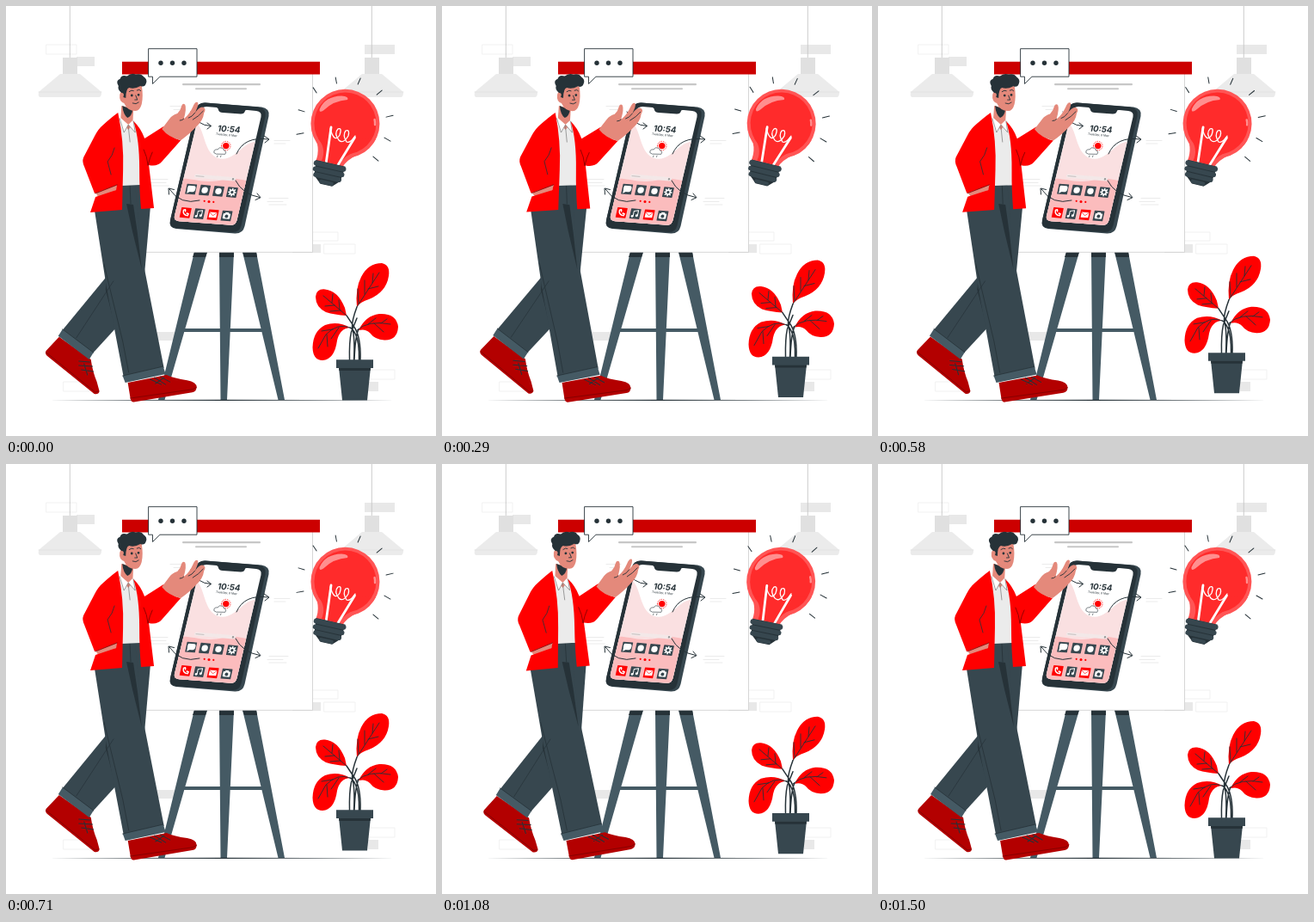
These frames come from a looping animation (500 by 500 pixels, 1540 ms). An HTML page with a canvas:

```html
<!DOCTYPE html>
<html lang="en">
<head>
<meta charset="utf-8">
<style>
html, body { margin: 0; width: 100%; height: 100%; overflow: hidden; background: #fff; }
canvas { display: block; width: 500px; height: 500px; }
</style>
</head>
<body>
<canvas id="stage"></canvas>
<script>
const canvas = document.getElementById('stage');
const ctx = canvas.getContext('2d');
const ratio = window.devicePixelRatio || 1;
canvas.width = canvas.height = 500 * ratio;

const LOOP = 1540, STEP = 1000 / 24, STEPS = 37;
const INK = '#263238', SLATE = '#37474f', STEEL = '#455a64';
const RED = '#ff0000', DEEP = '#cc0000', SHOE = '#b30000', SKIN = '#e4897b';
const PALE = '#ebebeb', MUTED = '#e0e0e0';

const paths = new Map();
function shape(d) {
  if (!paths.has(d)) paths.set(d, new Path2D(d));
  return paths.get(d);
}
function fill(d, color) {
  ctx.fillStyle = color;
  ctx.fill(shape(d));
}
function line(d, color = INK, width = 1) {
  ctx.strokeStyle = color;
  ctx.lineWidth = width;
  ctx.stroke(shape(d));
}
function rect(x, y, w, h, color, r = 0) {
  ctx.fillStyle = color;
  ctx.beginPath();
  ctx.roundRect(x, y, w, h, r);
  ctx.fill();
}
function dot(x, y, r, color) {
  ctx.fillStyle = color;
  ctx.beginPath();
  ctx.arc(x, y, r, 0, Math.PI * 2);
  ctx.fill();
}
function group(draw) {
  ctx.save();
  draw();
  ctx.restore();
}
function turnAbout(x, y, angle) {
  ctx.translate(x, y);
  ctx.rotate(angle);
  ctx.translate(-x, -y);
}

function drawLamp(x) {
  group(() => {
    ctx.translate(x, 0);
    line('M.3 0V60', '#c7c7c7', .9);
    fill('M-8 60H9V79H-8Z', MUTED);
    fill('M-11 79H12L37 100Q37 106 34 106H-34Q-37 106-36 100Z', PALE);
    line('M-36 100H37', MUTED, .7);
  });
}

function drawRoom() {
  const solid = [[417, 45, 35, 11], [82, 59, 21, 11], [333, 277, 33, 10], [165, 379, 31, 10], [421, 437, 12, 11]];
  const hollow = [[47, 45, 35, 11], [357, 263, 29, 10], [370, 277, 36, 11], [67, 437, 30, 11], [421, 423, 31, 11]];
  solid.forEach(b => rect(...b, '#e8e8e8'));
  ctx.strokeStyle = '#eeeeee';
  ctx.lineWidth = .8;
  hollow.forEach(b => ctx.strokeRect(...b));
  drawLamp(74);
  drawLamp(425);
}

function drawBoard() {
  fill('M219 286H234L184.5 458H177Z M248 286H265L257 458H249.5Z M275 286H291L324 458H316.5Z', STEEL);
  fill('M219 286H234L232 292H217Z M248 286H265V292H248Z M275 286H291L292 292H277Z', INK);
  rect(205, 375, 94, 4, STEEL);
  fill('M49 458.3L251 457.7L453 458.3L251 458.9Z', INK);
  rect(143, 79, 214, 207, '#fff');
  line('M356.5 79V286.3H143', '#d2d2d2', .9);
  rect(135, 64.7, 230, 14.8, DEEP);
  rect(205, 90, 91, 2.2, '#c7c7c7', 1);
  rect(220, 95.2, 60, 2, '#c7c7c7', 1);
  line('M312 156.5H330M312 160H325M306 223.5H328M304 227.5H322M306 231H326M168 201.5H188M168 205.5H186M168 209H189M191 116.5H208M195 120.5H206', '#e6e6e6', .8);
}

function drawBubble() {
  fill('M166 49.7H222V82H179L170.5 90.5V82H166Z', '#fff');
  line('M166 49.7H222V82.2H179L170.5 90.5V82.2H166Z', INK, .9);
  [180, 193.5, 207].forEach(x => dot(x, 66.3, 2.7, INK));
}

// Places a drawing in the slanted plane of the phone screen.
function onScreen(x, y, draw) {
  group(() => {
    ctx.transform(1, .085, -.22, 1, x, y);
    draw();
  });
}

function drawIcons() {
  const glyphs = [
    () => fill('M-3-4H3Q5-4 5-1Q5 3 2 3H-1L-4 5V2Q-5-4-3-4Z', '#fff'),
    () => dot(0, 0, 3.6, '#fff'),
    () => dot(0, 0, 3.6, '#fff'),
    () => {
      line('M0-4V4M-4 0H4M-2.9-2.9L2.9 2.9M2.9-2.9L-2.9 2.9', '#fff', 1.6);
      dot(0, 0, 3.2, '#fff');
      dot(0, 0, 1.6, SLATE);
    },
    () => line('M-3-3Q-3 3 3 3L3.5 1L1.5 .5M-3-3L-1-3.5L-.5-1.5', '#fff', 1.5),
    () => {
      line('M-2 3V-3L3-4V2', '#fff', 1);
      dot(-3, 3, 1.4, '#fff');
      dot(2, 2, 1.4, '#fff');
    },
    () => {
      rect(-4.3, -3, 8.6, 6.2, '#fff');
      line('M-4-2.5L0 1L4-2.5', RED, .6);
    },
    () => {
      rect(-4.2, -2.8, 8.4, 6.2, '#fff', 1);
      rect(-2, -4, 4, 2, '#fff');
      dot(0, .4, 2, SLATE);
    }
  ];
  glyphs.forEach((glyph, i) => {
    const row = i >> 2, col = i % 4;
    onScreen(215.2 + col * 15.9 - row * 6.4, 213 + col * 1.2 + row * 27.4, () => {
      rect(-5.8, -5.9, 11.6, 11.8, i === 4 || i === 6 ? RED : SLATE, .5);
      glyph();
    });
  });
}

function drawPhone() {
  fill('M232 112.5L297 117.5Q307 119 305.5 128L277.5 256Q275.5 265 266 264.6L198 259Q189 258 191 249L221 120Q223 112 232 112.5Z', SLATE);
  fill('M232 112.5L293 117.5Q303 119 301.5 128L273.5 255Q271.5 263.5 263 263L198 258.5Q189 257.5 191 249L221 120Q223 112 232 112.5Z', INK);
  const screen = 'M233 117L245 118Q247 119 247 121Q248 124 252 124L273 125.5Q277 125.5 278 122Q278 120.5 281 121L291 122Q298 123 296.5 129L268.5 249Q267 255 262 254.7L201 250.2Q194.5 249.5 196 244L225 123Q227 117 233 117Z';
  group(() => {
    ctx.clip(shape(screen));
    fill('M180 100H310V270H180Z', '#fff');
    fill('M218 132C228 139 229 153 234 164C240 178 253 182 265 173C276 165 284 155 296 158V270H180V132Z', '#fae0e1');
    fill('M180 202C210 197 222 205 238 204C255 203 265 196 290 207V270H180Z', '#fbbcbd');
  });
  onScreen(258, 147, () => {
    ctx.fillStyle = INK;
    ctx.textAlign = 'center';
    ctx.font = 'bold 9.6px Inter, sans-serif';
    ctx.fillText('10:54', .4, -.5);
    ctx.font = '3.3px Inter, sans-serif';
    ctx.fillText('Tuesday, 6 May', -1, 4);
  });
  ctx.setLineDash([.6, 1.8]);
  line('M250.6 162.6A5.2 5.2 0 1 1 261 162.6A5.2 5.2 0 1 1 250.6 162.6', RED, .8);
  ctx.setLineDash([]);
  dot(255.8, 162.6, 3.7, RED);
  const cloud = 'M244 172Q240.5 171 242 168.3Q244 166 246 167Q248 163.5 251.5 165.2Q253.5 166 253.5 168Q257 169 255 172Z';
  fill(cloud, '#fff');
  line(cloud, INK, .6);
  line('M246 174L245.5 175.5M250 174L249.5 175.5', INK, .6);
  onScreen(243, 199.5, () => {
    rect(-24, -2.2, 48, 4.4, '#f3e8e8', 2);
    line('M-22 0H-13', '#aaa', .6);
    dot(21, 0, 1.2, '#999');
  });
  [[230.7, 226.8], [236, 227.4], [241.3, 227.9]].forEach(([x, y], i) => dot(x, y, i === 1 ? 1.5 : 1.1, RED));
  drawIcons();
  line('M215 123Q222 139 238 139.5M234 136L238.5 139.5L234 143M268 172Q277 151 305 155M300 151L306 155L301 159M267 203Q275 219 295 222.5M292 218L296 222.7L290 225.5M225 226Q203 232 190 213M189.5 219L189 212L195.5 213.5', INK, 1);
}

function drawShoes() {
  fill('M62 385L99 411Q101 425 106 437L109 448Q108 452 103 451L48 407Q45 404 47 401Z', SHOE);
  line('M47 403L104 449L108 448', '#7d0000', .8);
  line('M85 413L98 414M85 418L101 419M88 423L102 425M91 416L95 429', INK, 1);
  fill('M142 438L187 429Q196 433 211 435Q222 437 222 443Q222 448 217 449L149 460.5Q146 461 145 456Z', SHOE);
  line('M145 456L218 445.5L222 443', '#7d0000', .8);
  line('M168 434L181 440M173 432L186 440M180 431L191 437M174 439L184 432', INK, 1);
}

function drawTrousers() {
  fill('M120 311L66 377L101 404L132 370Z', SLATE);
  fill('M134 208H158L168 232L160 325L140 345L118 300L108 236Z', SLATE);
  fill('M117 315L132 368L128 376L116 330Z', INK);
  fill('M103 238L135 208H150L158 290L184 421L137 431L117 327Z', SLATE);
  fill('M140 230L148 231L153 265L158 306L147 262Z', INK);
  line('M114 300L136 390L143 426M156 210L159 234M144 209L145 230', INK, .8);
  line('M125 320L82 386', INK, .7);
  fill('M66 376L102 403L97 411L61 384Z', STEEL);
  line('M66 376L102 403', INK, .8);
  fill('M136 430L183 419L186 428L139 438Z', STEEL);
  line('M136 430L183 419', INK, .8);
}

function drawHand() {
  fill('M181 143L190 131Q193 127 199 125Q203 121 203.5 117Q205 112 208 114.5Q210 119 206.5 131Q213 126 217 117Q220 110 222.8 112Q224 115 219.5 124Q225 116 229 117.5Q233 119 230 124Q229 133 221 140Q214 148 203 156Q189 153 181 143Z', SKIN);
  line('M206.5 131Q205 133 202 133M219.5 124Q216 129 212 130M229 122Q224 128 217 132', INK, .9);
}

function drawTorso() {
  fill('M131 130L150 134L156 155V208L134 209Z', PALE);
  fill('M134 116L148 119L147 138L142 144L133 133Z', SKIN);
  fill('M135 116L147 121Q146 128 141 130Q136 126 135 116Z', INK);
  fill('M133 130L142 138L137 147L131 134Z M147 133L150 147L142 138Z', '#fff');
  line('M132 131L137 147L142 138L150 147L148 134M142 140L144 158', '#777', .7);
  fill('M105 212L128 206L130 213L112 222Q103 223 105 212Z', SKIN);
  fill('M130 124Q123 129 113 138Q107 143 103 151L90 176Q88 181 91 187L103 218L129 208L128 214L104 222L98 240L135 237L136 190Q137 157 130 124Z', RED);
  fill('M148 134Q156 141 161 154L183 140Q191 154 203 156L181 181Q176 187 166 185L172 235L157 236Q155 215 155 190Q155 155 148 134Z', RED);
  line('M104 218L129 208M165 185Q164 175 160 167M170 170Q167 176 165 185', '#7a0000', .8);
  line('M126 165Q124 174 118 181L122 196', INK, .8);
  drawHand();
}

function drawHead() {
  fill('M136 93H157.5Q159.5 105 157.5 114Q155.5 122 150 122Q141 122 137 113Q131 111 132 103Q133 98 137 101Z', SKIN);
  fill('M134 101Q129 97 130.5 93Q126.5 87 132.5 84.5Q133.5 79.5 140.5 81.5Q145 77.5 150.5 79.5Q157 78 159.5 82Q164.5 85 162.5 90Q161 95 156 93Q149 97 143 95Q139 96 139 107L136 106Q138 101 134 101Z', INK);
  dot(146, 104, 1.4, INK);
  dot(153.8, 103.3, 1.4, INK);
  line('M143 99.5Q146 97 148 98.5M152 98Q155 96 156.5 98.5M150.5 104L152.5 109L149.5 109M147 113Q151 115 154 112', INK, .9);
}

function drawMan(angle) {
  group(() => {
    turnAbout(136, 255, angle);
    drawShoes();
    drawTrousers();
    drawTorso();
    drawHead();
  });
}

function drawBulb(angle) {
  const rim = '#ff5555', glass = '#ff2b2b', shine = '#ff8f8f';
  group(() => {
    turnAbout(394, 150, angle);
    line('M357 95L361 101M340 121L347 123M338 149.5L346 148M383 83L384.3 90M412 84L409 91M437 98L431 103M442 129L450 127M440 153L447 157M427 175L433 180', INK, 1);
    fill('M356.5 148Q367 164 360 181L391 188Q396 179 409 173Q424 166 430 155Z', rim);
    dot(394.4, 136.8, 40, rim);
    dot(394.4, 136.5, 36, glass);
    fill('M363 154Q373 166 367 180L387 185Q393 174 409 168L424 155Z', glass);
    fill('M364.5 120Q371 105 390 104.5Q399 105 397 109Q381 110 369 121.5Q364 125 364.5 120Z', shine);
    line('M428.5 132Q429.3 135 429 138', shine, 2.4);
    line('M378 141L372.5 181M405.5 153L386 185', '#fff', 2.8);
    line('M377 143Q382 160 388 150Q391 141 386 143Q381 148 387 156Q392 161 398 151Q400 143 395 145Q391 150 396 158Q400 160 406 151', '#fff', 1.3);
    ctx.translate(374.8, 193.5);
    ctx.rotate(.22);
    fill('M-17-11H18L16 7L8 15H-6L-15 7Z', INK);
    rect(-19, -10.5, 38.5, 6, SLATE, 3);
    rect(-18.5, -3.5, 37.5, 5.5, SLATE, 3);
    rect(-16.5, 3, 33.5, 5.5, SLATE, 3);
    rect(-8, 10, 17, 4.5, SLATE, 2);
  });
}

function drawPlant(lift) {
  group(() => {
    ctx.translate(0, -lift);
    fill('M408 350Q406 328 413 315Q421 299 437 299Q447 301 445 314Q442 333 422 341Q412 344 408 350Z', RED);
    fill('M396 360Q382 359 372 356Q360 350 360 338Q361 328.5 371 329.5Q386 331 394 351Z', RED);
    fill('M400 374Q388 375 385 389Q382 411 368 412Q357 412 356.5 397Q357 378 371 371Q386 366 400 374Z', RED);
    fill('M410 377Q418 360 434 358Q454 357 456 373Q455 389 440 388.5Q429 388 423 380Q418 375 410 377Z', RED);
    line('M408 350L434 310M410 346L409 329M417 335L417 319M421 329L433 326M426 322L427 311', INK, .9);
    line('M396 360L369 337M382 348L371 349M389 354L377 355M379 345L380 335M388 353L387 342', INK, .9);
    line('M400 374Q386 368 372 382L363 398M380 376L367 378M373 382L374 396M387 374L378 387', INK, .9);
    line('M408 377Q421 365 447 370M421 370L430 363M428 369L439 379M436 369L443 364', INK, .9);
    line('M404.5 412Q406 385 402.5 374Q402 366 408 350M412 412Q413 384 404 372L396 360M399.5 412Q399 390 401.5 379L408 363M410.5 412Q411 390 406 381Q403 375 400 374M405 412Q406 384 410 376', INK, 1.5);
    fill('M387 420H424L420 458.5H391Z', SLATE);
    fill('M387 421H424L423.6 424H387.4Z', INK);
    rect(384, 411.3, 43, 9.7, SLATE);
  });
}

function draw(time) {
  const step = Math.floor((time % LOOP + 5) / STEP) % STEPS;
  const phase = 2 * Math.PI * (step + .84) / STEPS;
  const sway = Math.sin(phase);
  ctx.setTransform(ratio, 0, 0, ratio, 0, 0);
  ctx.lineCap = ctx.lineJoin = 'round';
  ctx.fillStyle = '#fff';
  ctx.fillRect(0, 0, 500, 500);
  drawRoom();
  drawBoard();
  drawBubble();
  drawPhone();
  drawBulb(sway * .02);
  drawPlant(4.5 * (1 - Math.cos(phase)));
  drawMan(sway * .0138);
}

const start = performance.now();
function tick() {
  draw(performance.now() - start);
  requestAnimationFrame(tick);
}
tick();
</script>
</body>
</html>
```
